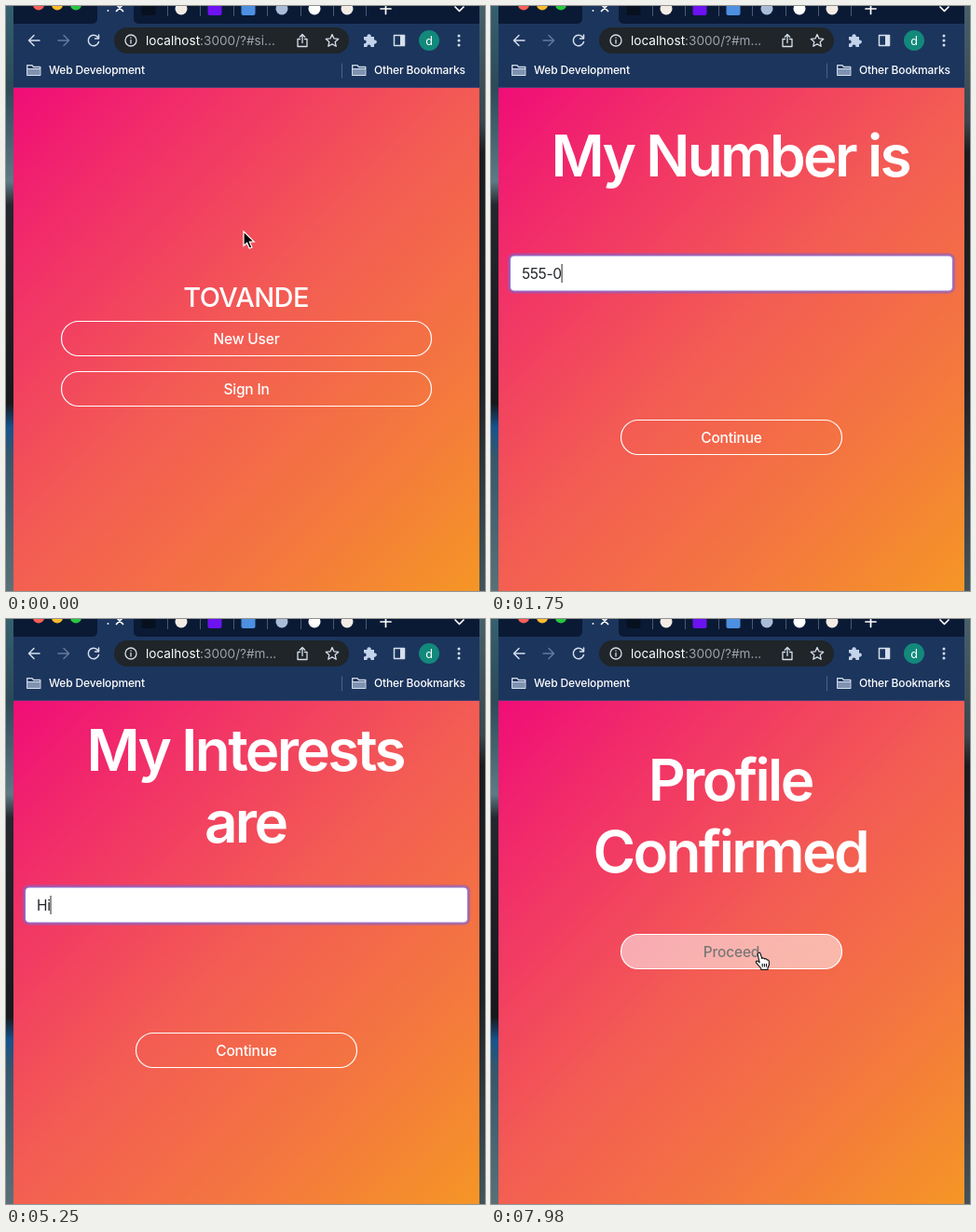
An HTML page for the animation above (8000 ms loop, 514 px wide and 628 px high).

```html
<!DOCTYPE html>
<html lang="en">
<head>
<meta charset="utf-8">
<title>Sign-up flow</title>
<style>
  html, body { margin: 0; width: 100%; height: 100%; overflow: hidden; background: #1c355d; }
  svg { display: block; width: 100vw; height: 100vh; }
  text { font-family: Inter, Roboto, "Liberation Sans", sans-serif; font-optical-sizing: none; fill: #fff; white-space: pre; }
  .mid { text-anchor: middle; }
  .title { font-size: 62px; font-weight: 600; letter-spacing: -.043em; }
  .brand { font-size: 29px; font-weight: 500; letter-spacing: -.02em; }
  .label { font-size: 15.5px; font-weight: 500; letter-spacing: -.012em; }
  .field { font-size: 15.5px; letter-spacing: -.025em; }
  .mark { font-size: 12px; font-weight: 500; letter-spacing: -.012em; }
  .url { font-size: 13.6px; }
  .line { fill: none; stroke: #d5dfec; stroke-width: 1.5; stroke-linecap: round; stroke-linejoin: round; }
</style>
</head>
<body>
<svg viewBox="0 0 514 628" preserveAspectRatio="none">
  <defs>
    <linearGradient id="page" gradientUnits="userSpaceOnUse" x1="-2" y1="98" x2="518" y2="618">
      <stop offset="0" stop-color="#f00d78"/><stop offset=".15" stop-color="#f1276c"/>
      <stop offset=".48" stop-color="#f35b54"/><stop offset=".75" stop-color="#f4773f"/>
      <stop offset="1" stop-color="#f59625"/>
    </linearGradient>
    <linearGradient id="left" x2="0" y2="1">
      <stop offset="0" stop-color="#35606f"/><stop offset=".14" stop-color="#2c4a58"/>
      <stop offset=".3" stop-color="#5d7a85"/><stop offset=".34" stop-color="#24272d"/>
      <stop offset=".68" stop-color="#17181c"/><stop offset=".72" stop-color="#16548c"/>
      <stop offset=".77" stop-color="#37566b"/><stop offset="1" stop-color="#5a7078"/>
    </linearGradient>
    <linearGradient id="right" x2="0" y2="1">
      <stop offset="0" stop-color="#46606b"/><stop offset=".2" stop-color="#3a464d"/>
      <stop offset=".25" stop-color="#1b1c1f"/><stop offset=".65" stop-color="#202226"/>
      <stop offset=".8" stop-color="#30383d"/><stop offset="1" stop-color="#44545b"/>
    </linearGradient>
  </defs>

  <rect width="10" height="628" fill="url(#left)"/>
  <rect x="506" width="8" height="628" fill="url(#right)"/>
  <rect x="8" y="0" width="500" height="628" fill="#1c355d"/>
  <path d="M8 0H98V13Q98 19 92 19H8ZM137 0H508V19H143Q137 19 137 13Z" fill="#0a1a35"/>
  <circle cx="35" cy="-1.5" r="6" fill="#fe5f57"/>
  <circle cx="55" cy="-1.5" r="6" fill="#febc2e"/>
  <circle cx="75" cy="-1.5" r="6" fill="#28c840"/>
  <circle cx="109.5" cy="5" r=".9" fill="#fff"/>
  <path class="line" d="M118.500-1.500l7 7m0-7l-7 7M402 3h11M407.500-2v10.500M482 1l4.500 4.500l4.500-4.500" style="stroke:#fff;stroke-width:1.700"/>
  <g id="tabs"></g>

  <rect x="116" y="23" width="252" height="28" rx="14" fill="#1f2528"/>
  <g class="line">
    <path d="M36 37H24.500m5.500-5.500L24.500 37l5.500 5.500"/>
    <path d="M56 37h11.500m-5.500-5.500l5.500 5.500l-5.500 5.500" stroke="#64799a"/>
    <path d="M98.500 33.500a5.700 5.700 0 1 0 1 5M99.500 31v4h-4"/>
    <g stroke-width="1.300">
      <circle cx="134" cy="37" r="6"/><path d="M134 36.500v3.500M134 34v.2"/>
      <path d="M315.500 35.500H313V43.500h10V35.500h-2.500M318 39.500V30.500m-2.700 2.700L318 30.500l2.700 2.700"/>
      <path d="M350 30.500l2 4.400l4.700.5l-3.500 3.200l1 4.700l-4.200-2.400l-4.200 2.400l1-4.700l-3.500-3.200l4.700-.5z"/>
    </g>
    <rect x="416.500" y="31.500" width="11" height="11"/>
    <path d="M360.500 62v15" stroke="#4c6285" stroke-width="1"/>
  </g>
  <path d="M384 33h3.500a2.200 2.200 0 1 1 4.200 0h3.300v3.500a2.200 2.200 0 1 1 0 4.200v3.300h-3.600a2 2 0 1 0-3.800 0H384v-3.700a2 2 0 1 0 0-3.800z" fill="#c3d3ea"/>
  <path d="M423 31h5v12h-5z" fill="#d5dfec"/>
  <circle cx="454" cy="37" r="11" fill="#12897b"/>
  <text class="mid" x="454" y="41.500" font-size="12.500">d</text>
  <g fill="#d5dfec"><circle cx="486" cy="32" r="1.500"/><circle cx="486" cy="37" r="1.500"/><circle cx="486" cy="42" r="1.500"/></g>
  <g id="folders"></g>
  <text class="mark" x="46" y="73.300">Web Development</text>
  <text class="mark" x="395" y="73.300">Other Bookmarks</text>
  <text class="url" x="150" y="42">localhost<tspan fill="#9aa3ad" id="path"></tspan></text>

  <rect x="8" y="87" width="500" height="541" fill="url(#page)"/>
  <path d="M8 87.500H508" stroke="#4a4271"/>
  <g id="view"></g>
  <g id="cursor">
    <path id="arrow" d="M0 0V15.500L3.600 12.200L6.200 18.200L8.900 17L6.300 11.200H11.200Z" fill="#000" stroke="#fff" stroke-width="1.200"/>
    <path id="hand" d="M-1.800 1.200C-2.200-1 .6-1.600 1.200.4L2.700 5.500C3.600 4.500 5.200 4.800 5.500 6C6.500 5.200 7.900 5.700 8.100 7C9.200 6.600 10.200 7.300 10.300 8.600L10.500 12L9 15.500V17.500H1.800V16L-3.300 10.200C-4.500 8.500-2.400 7.400-1 8.700L.2 9.800Z M3.200 11v3.500M5.400 11v3.500M7.500 11v3.500" fill="#fff" stroke="#111" stroke-width="1.100" stroke-linejoin="round"/>
  </g>
</svg>
<script>
const LOOP = 8000, STEP = 70, FADE = 150;
const $ = id => document.getElementById(id);

const tabs = [[153, '#06101f'], [188, '#f3ece4', 1], [224, '#6d12f0'], [260, '#4d8fe0'],
  [296, '#a9bdd8', 1], [331, '#fff', 1], [366, '#f3ece4', 1]];
$('tabs').innerHTML = tabs.map(([x, c, round]) =>
  (round ? `<circle cx="${x}" cy="3" r="6.500" fill="${c}"/>`
    : `<rect x="${x - 7.5}" y="-4" width="15" height="14" rx="2" fill="${c}"/>`) +
  `<path d="M${x + 20}.5-4V11" stroke="#4a5a74"/>`).join('');
$('folders').innerHTML = [22, 371].map(x =>
  `<path class="line" style="stroke-width:1.300" d="M${x + .7} 74.300V63.700h5.300l1.500 1.800h7.300v8.800zM${x + .7} 67.700h14.100"/>
   <path d="M${x + 1} 68h13.500v6H${x + 1}z" fill="#7f93b1"/>`).join('');

// at: shown from; type: [start, steps]
const forms = [
  { at: 1120, title: ['My Number is'], hint: '(XXX) XXX-XXXX', text: '555-0142', type: [1470, 8] },
  { at: 2030, title: ['My Name is'], hint: 'How others will see your name', text: 'Dee', type: [2310, 3] },
  { at: 2660, title: ['My Birthday is'], hint: 'MM/DD/YYYY', text: '04/12/1994', type: [3080, 4] },
  { at: 3500, title: ['My City is'], hint: '...', text: 'Oakland', type: [3780, 5] },
  { at: 4270, title: ['My Occupation', 'is'], hint: '...', text: 'Engineer', type: [4550, 4] },
  { at: 4970, title: ['My Interests', 'are'], hint: '...', text: 'Hiking', type: [5250, 4] }
];
const wide = [59.5, 397], narrow = [139.5, 237];

// [time, x, y]
const moves = [
  [[140, 255, 242], [350, 258, 290], [560, 264, 375], [770, 264.5, 414], [1470, 264.5, 414]],
  [[6510, 265, 414], [6860, 290, 404], [7280, 297, 386], [7420, 290, 377], [7490, 288, 359], [8000, 288, 359]]
];

const clamp = v => Math.max(0, Math.min(1, v));
const mix = (a, b, p) => a + (b - a) * p;

function along(keys, t) {
  if (t <= keys[0][0]) return keys[0].slice(1);
  const i = keys.findIndex(k => k[0] > t);
  if (i < 0) return keys[keys.length - 1].slice(1);
  const a = keys[i - 1], b = keys[i], p = (t - a[0]) / (b[0] - a[0]);
  return [mix(a[1], b[1], p), mix(a[2], b[2], p)];
}

const text = (cls, x, y, s, fill = '#fff') =>
  `<text class="${cls}" x="${x}" y="${y}" style="fill:${fill}">${s}</text>`;

function button([x, w], y, label, hover = 0) {
  const c = Math.round(255 * (1 - hover));
  return `<rect x="${x}" y="${y}" width="${w}" height="37" rx="18.500"
      fill="#fff" fill-opacity="${hover}" stroke="#fff" stroke-width="1.200"/>` +
    text('label mid', 258, y + 24.3, label, `rgb(${c},${c},${c})`);
}

const heading = (lines, y) =>
  lines.map((s, i) => text('title mid', 256.7, y + 77 * i, s)).join('');

// hover level: rises from `on`, falls from `off`
const hover = (t, on, off = Infinity) =>
  t < off ? clamp((t - on) / FADE) : 1 - clamp((t - off) / FADE);

function home(t) {
  return text('brand mid', 257.5, 323, 'TOVANDE') +
    button(wide, 338.5, 'New User', hover(t, 470, 560)) +
    button(wide, 392.5, 'Sign In', hover(t, 610));
}

function form(f, t) {
  const two = f.title.length > 1, y = two ? 288 : 268;
  const [start, steps] = f.type;
  const part = clamp((Math.floor((t - start) / STEP) + 1) / steps);
  const typed = f.text.slice(0, Math.ceil(f.text.length * part));
  return heading(f.title, two ? 163 : 183) +
    `<rect x="17.800" y="${y - 2.8}" width="480.400" height="43.600" rx="7" fill="#8a5fc4" opacity=".55"/>
     <rect x="20.500" y="${y}" width="475" height="38" rx="4.500" fill="#fff" stroke="#8f78d6" stroke-width="1.200"/>` +
    `<g id="entry">${text('field', 33, y + 25, typed || f.hint, typed ? '#212529' : '#636a71')}</g>` +
    `<path id="caret" d="M33.500 ${y + 9}v20" stroke="#222"/>` +
    button(narrow, 444.5, 'Continue');
}

const notice = (lines, label, level) =>
  heading(lines, 195) + button(narrow, 338.5, label, level);

function scene(t) {
  if (t < forms[0].at) return home(t);
  if (t < 5880) return form(forms.filter(f => f.at <= t).pop(), t);
  return t < 7840
    ? notice(['Confirming', 'Profile'], 'Confirm', hover(t, 7450))
    : notice(['Profile', 'Confirmed'], 'Proceed', hover(t, 7900));
}

function pointer(t) {
  const shown = t < 1470 || t >= 6510;
  $('cursor').style.display = shown ? '' : 'none';
  if (!shown) return;
  const [x, y] = along(moves[t < 1470 ? 0 : 1], t);
  const onButton = t < 1120
    ? (y >= 338 && y <= 376) || y >= 392
    : t > 6000 && y >= 338 && y <= 376;
  $('cursor').setAttribute('transform', `translate(${x} ${y})`);
  $('arrow').style.display = onButton ? 'none' : '';
  $('hand').style.display = onButton ? '' : 'none';
}

let last = -1;
function draw(t) {
  if (t === last) return;
  last = t;
  $('path').textContent = t < forms[0].at ? ':3000/?#si...' : ':3000/?#m...';
  $('view').innerHTML = scene(t);
  const caret = $('caret');
  const f = forms.filter(f => f.at <= t).pop();
  if (caret && t >= f.type[0]) {
    const w = $('entry').firstChild.getComputedTextLength();
    caret.setAttribute('transform', `translate(${w} 0)`);
  }
  pointer(t);
}

const origin = performance.now();
function tick() {
  const t = (performance.now() - origin) % LOOP;
  draw(Math.floor(t / STEP) * STEP);
  requestAnimationFrame(tick);
}
tick();
</script>
</body>
</html>
```
